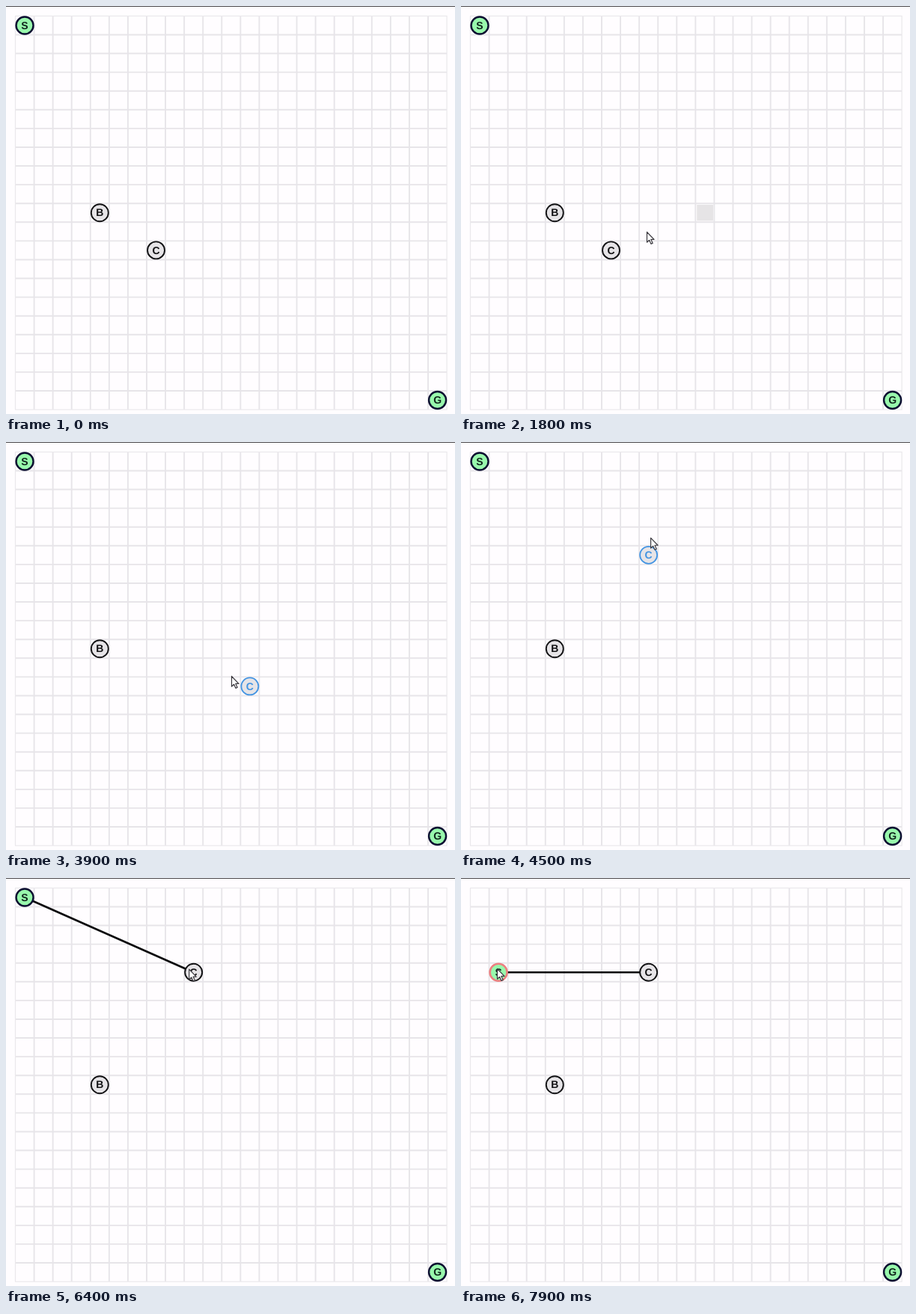
These frames come from a looping animation (600 by 546 pixels, 8000 ms). An HTML page:

```html
<!DOCTYPE html>
<html lang="en">
<head>
<meta charset="utf-8">
<title>Graph editor</title>
<style>
  html, body { margin: 0; width: 100%; height: 100%; overflow: hidden; background: #fffdff; }
  svg { display: block; width: 600px; height: 546px; }
  .grid { fill: none; stroke: #e7e5e9; stroke-width: 1.9; }
  .frame { fill: none; stroke: #eae8ec; stroke-width: 1.2; }
  .cell { fill: #e6e4e6; }
  .edge { stroke: #0a0a0c; stroke-width: 2.6; }
  .node circle { fill: #e6e4e7; stroke: #121214; stroke-width: 1.9; }
  .node text {
    font: bold 14px "Liberation Sans", Arial, sans-serif;
    text-anchor: middle; text-rendering: geometricPrecision; fill: #121214;
  }
  .end circle { fill: #98f8ac; stroke: #0b0d30; stroke-width: 2.4; }
  .end text { fill: #10241c; }
  .picked circle { stroke: #4394e2; stroke-width: 1.8; }
  .picked text { fill: #4394e2; }
  .dragged circle { stroke: #ec7f80; stroke-width: 2.6; }
  .cursor { fill: #fff; stroke: #3c3a40; stroke-width: 1.2; stroke-linejoin: round; }
</style>
</head>
<body>
<svg viewBox="0 0 600 546">
  <rect width="600" height="1" fill="#4a484c"/>
  <path id="grid" class="grid"/>
  <rect class="frame" x="12.5" y="13.4" width="576.6" height="526.7"/>
  <rect id="cell" class="cell" x="315.2" y="266" width="21.8" height="21.4"/>
  <line id="edge" class="edge"/>
  <g id="nodes"></g>
  <path id="cursor" class="cursor" d="M.5 .5V14.2L3.6 11.3L6 16.4L8.2 15.4L5.9 10.4H10Z"/>
</svg>
<script>
const LOOP = 8000, FRAME = 100, LAG = 60;
const X0 = 12.5, Y0 = 13.4, STEP_X = 25.07, STEP_Y = 25.08, COLS = 23, ROWS = 21;
const $ = id => document.getElementById(id);

// cursor stops: arrival time, x, y, rest
const stops = [
  [300, 8, 536, 0],
  [1100, 326, 281, 600],
  [1800, 248, 302, 0],
  [2100, 199, 325, 800],
  [3200, 267, 204, 0],
  [3400, 440, 130, 0],
  [3750, 365, 318, 0],
  [3900, 301, 313, 0],
  [4600, 252, 120, 100],
  [5500, 22, 24, 100],
  [6100, 252, 125, 200],
  [7200, 25, 28, 100],
  [7900, 48, 121, 100]
].map(([t, x, y, rest]) => ({ t, x, y, rest, leave: t + rest }));

// the cursor glides through a stop, or halts where it rests
function slope(i, axis) {
  const prev = stops[i - 1], next = stops[i + 1];
  if (!prev || !next || stops[i].rest) return 0;
  return (next[axis] - prev[axis]) / (next.t - prev.leave);
}

function tipAt(t) {
  const i = Math.max(1, stops.findIndex(k => k.leave >= t));
  const a = stops[i - 1], b = stops[i], span = b.t - a.leave;
  const p = Math.min(1, Math.max(0, (t - a.leave) / span)), q = 1 - p;
  return ["x", "y"].map(axis =>
    a[axis] + (b[axis] - a[axis]) * p * p * (3 - 2 * p) +
    span * p * q * (slope(i - 1, axis) * q - slope(i, axis) * p));
}

const center = (col, row) => [X0 + (col + .5) * STEP_X, Y0 + (row + .5) * STEP_Y];
const snap = ([x, y]) => center(Math.floor((x - X0) / STEP_X), Math.floor((y - Y0) / STEP_Y));

function place(el, [x, y]) {
  el.setAttribute("transform", `translate(${x.toFixed(2)} ${y.toFixed(2)})`);
}

function show(el, on) {
  el.style.display = on ? "" : "none";
}

function addNode(label, col, row, cls = "") {
  const g = document.createElementNS("http://www.w3.org/2000/svg", "g");
  g.setAttribute("class", "node " + cls);
  g.innerHTML = `<circle r="11.5"/><text y="4.6">${label}</text>`;
  $("nodes").append(g);
  place(g, center(col, row));
  return g;
}

let d = "";
for (let i = 1; i < COLS; i++) d += `M${X0 + i * STEP_X} ${Y0}v${ROWS * STEP_Y}`;
for (let j = 1; j < ROWS; j++) d += `M${X0} ${Y0 + j * STEP_Y}h${COLS * STEP_X}`;
$("grid").setAttribute("d", d);

const s = addNode("S", 0, 0, "end");
addNode("G", 22, 20, "end");
addNode("B", 4, 10);
const c = addNode("C", 7, 12);

function draw(t) {
  const tip = tipAt(t);
  place($("cursor"), tip);
  show($("cursor"), t >= 400);
  show($("cell"), t >= 1400 && t < 2500);

  // a dragged node snaps to the cell the cursor was just over
  const dragged = snap(tipAt(t - LAG));
  const cPos = t < 3000 ? center(7, 12) : t < 4700 ? dragged : center(9, 4);
  const sPos = t < 7300 ? center(0, 0) : dragged;
  place(c, cPos);
  place(s, sPos);
  c.classList.toggle("picked", t >= 2600 && t < 5700);
  s.classList.toggle("dragged", t >= 7200);

  const [x1, y1] = sPos, [x2, y2] = t < 6100 ? tip : cPos;
  show($("edge"), t >= 5700);
  for (const [name, v] of Object.entries({ x1, y1, x2, y2 })) $("edge").setAttribute(name, v);
}

const start = performance.now();
function tick() {
  const t = (performance.now() - start) % LOOP;
  draw(Math.floor(t / FRAME) * FRAME);
  requestAnimationFrame(tick);
}
tick();
</script>
</body>
</html>
```
